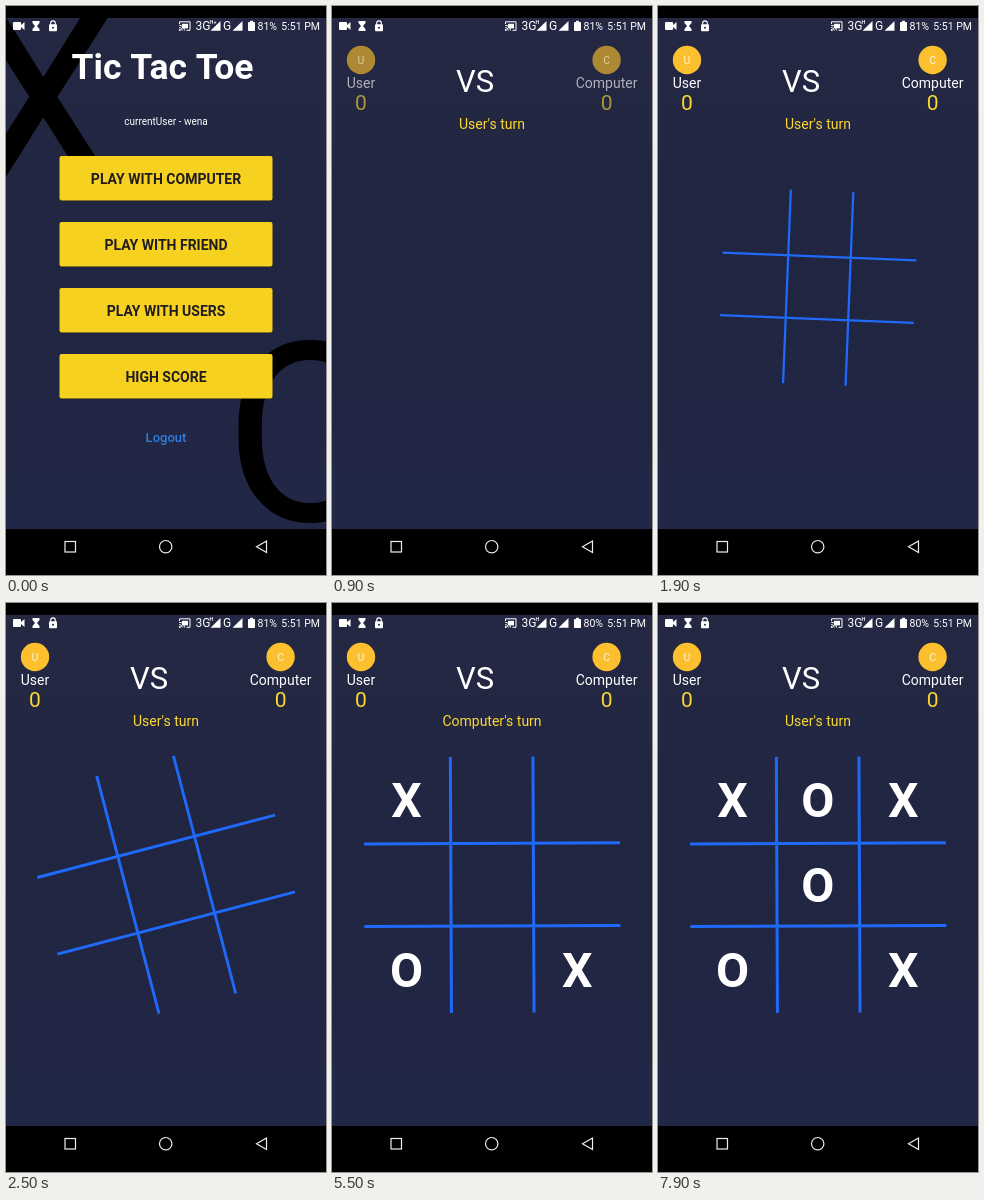
These frames come from a looping animation (320 px wide and 569 px high, 8000 ms). An HTML page with a canvas:

```html
<!DOCTYPE html>
<html lang="en">
<head>
<meta charset="utf-8">
<title>Tic Tac Toe</title>
<style>
html, body { margin: 0; width: 100%; height: 100%; overflow: hidden; background: #000; }
canvas { display: block; width: 320px; height: 569px; }
</style>
</head>
<body>
<canvas id="stage"></canvas>
<script>
const W = 320, H = 569, LOOP = 8000;
const TOP = 12, BOTTOM = 523;
const canvas = document.getElementById('stage');
const ctx = canvas.getContext('2d');
const dpr = window.devicePixelRatio || 1;
canvas.width = W * dpr;
canvas.height = H * dpr;

const YELLOW = '#fdd82f', AMBER = '#fcc02e', WHITE = '#fff', BLUE = '#1f69fb';
const BUTTONS = ['PLAY WITH COMPUTER', 'PLAY WITH FRIEND', 'PLAY WITH USERS', 'HIGH SCORE'];
// time, mark, column, row
const MOVES = [
  [3400, 'X', 0, 0], [4400, 'O', 0, 2], [5320, 'X', 2, 2],
  [6300, 'O', 1, 1], [6750, 'X', 2, 0], [7600, 'O', 1, 0]
];

const clamp = v => Math.max(0, Math.min(1, v));
const ramp = (t, from, to) => clamp((t - from) / (to - from));
const easeOut = p => 1 - Math.pow(1 - p, 3);

function text(str, x, y, size, color, weight = 400, align = 'center') {
  ctx.font = `${weight} ${size}px Roboto, sans-serif`;
  ctx.textAlign = align;
  ctx.fillStyle = color;
  ctx.fillText(str, x, y);
}

function poly(points, fill) {
  ctx.beginPath();
  points.forEach(([x, y]) => ctx.lineTo(x, y));
  ctx.closePath();
  if (fill) {
    ctx.fillStyle = fill;
    ctx.fill();
  } else {
    ctx.stroke();
  }
}

function box(x, y, w, h, r, color) {
  ctx.beginPath();
  ctx.roundRect(x, y, w, h, r);
  ctx.fillStyle = color;
  ctx.fill();
}

function disc(x, y, r, color) {
  ctx.beginPath();
  ctx.arc(x, y, r, 0, Math.PI * 2);
  ctx.fillStyle = color;
  ctx.fill();
}

function background() {
  const g = ctx.createLinearGradient(0, TOP, 0, BOTTOM);
  g.addColorStop(0, '#242843');
  g.addColorStop(0.5, '#202541');
  g.addColorStop(1, '#212746');
  ctx.fillStyle = g;
  ctx.fillRect(0, TOP, W, BOTTOM - TOP);
}

function menu() {
  background();
  text('X', 37, 181, 250, '#000');
  text('O', 304, 515, 250, '#000');
  text('Tic Tac Toe', 156.5, 73, 35.5, WHITE, 700);
  text('currentUser - wena', 160, 119, 10, WHITE);
  BUTTONS.forEach((label, i) => {
    const y = 150 + i * 66;
    box(53.5, y + 0.8, 213, 44.4, 2, 'rgba(0,0,0,0.35)');
    box(53.5, y, 213, 44.4, 2, '#f7d11f');
    text(label, 160, y + 28, 14, '#201d20', 700);
  });
  text('Logout', 160, 435.5, 13, '#2f7de0', 500);
}

function player(x, name) {
  disc(x, 54, 14.2, AMBER);
  text(name[0], x, 58, 10.5, '#fff3d6');
  text(name, x, 82, 14, WHITE);
  text('0', x, 104, 21, YELLOW);
}

function grid(t) {
  const s = easeOut(ramp(t, 1100, 3230));
  if (s <= 0) return;
  ctx.save();
  ctx.translate(160.2, 281.7);
  ctx.rotate((s * 360 - 0.25) * Math.PI / 180);
  ctx.scale(s, s);
  ctx.strokeStyle = BLUE;
  ctx.lineWidth = 3;
  ctx.beginPath();
  for (const d of [-41.3, 41.3]) {
    ctx.moveTo(d, -128);
    ctx.lineTo(d, 128);
    ctx.moveTo(-128, d);
    ctx.lineTo(128, d);
  }
  ctx.stroke();
  ctx.restore();
}

function game(t) {
  const done = MOVES.filter(m => t >= m[0]);
  const who = done.length % 2 ? 'Computer' : 'User';
  const page = ramp(t, 150, 810);
  if (page <= 0) return;
  ctx.globalAlpha = page;
  background();
  text('VS', 143, 85.5, 31, WHITE);
  text(who + "'s turn", 160, 123, 14, YELLOW);

  ctx.globalAlpha = ramp(t, 600, 1070);
  player(29, 'User');
  player(274.6, 'Computer');
  ctx.globalAlpha = 1;

  grid(t);
  for (const [, mark, col, row] of done) {
    text(mark, 74.5 + col * 85.4, 213.5 + row * 85.2, 48, WHITE, 700);
  }
}

function statusBar(t) {
  // camera
  box(7, 16, 8, 8, 1, WHITE);
  poly([[14.5, 19.5], [18.5, 16], [18.5, 24], [14.5, 20.5]], WHITE);
  // hourglass
  poly([[26.5, 15], [33.5, 15], [33.5, 17], [31, 20], [33.5, 23], [33.5, 25],
    [26.5, 25], [26.5, 23], [29, 20], [26.5, 17]], WHITE);
  // padlock
  box(43, 18.3, 8, 7, 1, WHITE);
  ctx.strokeStyle = WHITE;
  ctx.lineWidth = 1.1;
  ctx.beginPath();
  ctx.arc(47, 17.2, 2.3, Math.PI, 0);
  ctx.lineTo(49.3, 19);
  ctx.moveTo(44.7, 17.2);
  ctx.lineTo(44.7, 19);
  ctx.stroke();
  disc(47, 21.8, 1, '#242843');

  // cast
  ctx.lineWidth = 1;
  ctx.beginPath();
  ctx.moveTo(173.5, 18);
  ctx.lineTo(173.5, 15.8);
  ctx.lineTo(184, 15.8);
  ctx.lineTo(184, 24.3);
  ctx.lineTo(180.5, 24.3);
  for (const r of [3, 5.2]) {
    ctx.moveTo(173.2, 24.5 - r);
    ctx.arc(173.2, 24.5, r, -Math.PI / 2, 0);
  }
  ctx.stroke();
  box(176, 17.8, 6, 4.6, 0, WHITE);
  disc(173.8, 24, 1, WHITE);

  // signal, battery, clock
  const plus = t < 250 || (t >= 3450 && t < 5350);
  text('3G', 189.5, 24.3, 12, WHITE, 400, 'left');
  text(plus ? 'H+' : 'H', 203.5, 18, 5.5, WHITE, 500, 'left');
  poly([[204.5, 24.7], [214.5, 24.7], [214.5, 15]], WHITE);
  text('G', 217, 24.3, 12, WHITE, 400, 'left');
  poly([[226.5, 24.7], [236.5, 24.7], [236.5, 15]], WHITE);
  box(242, 16, 7, 9, 0.8, WHITE);
  box(244, 14.8, 3, 2, 0, WHITE);
  text(t < 3000 ? '81%' : '80%', 251.5, 24, 10.5, WHITE, 400, 'left');
  text('5:51 PM', 314, 24, 10.5, WHITE, 400, 'right');
}

function navBar() {
  ctx.fillStyle = '#000';
  ctx.fillRect(0, 0, W, TOP);
  ctx.fillRect(0, BOTTOM, W, H - BOTTOM);
  ctx.strokeStyle = '#eee';
  ctx.lineWidth = 1.2;
  ctx.strokeRect(59, 535.5, 10.5, 10.5);
  ctx.beginPath();
  ctx.arc(159.7, 540.7, 6.2, 0, Math.PI * 2);
  ctx.stroke();
  poly([[250.5, 540.7], [260.5, 535], [260.5, 546.4]]);
}

function draw(t) {
  ctx.setTransform(dpr, 0, 0, dpr, 0, 0);
  ctx.globalAlpha = 1;
  ctx.fillStyle = '#000';
  ctx.fillRect(0, 0, W, H);
  if (t < 810) menu();
  game(t);
  ctx.globalAlpha = 1;
  navBar();
  statusBar(t);
}

const start = performance.now();
function tick() {
  draw((performance.now() - start) % LOOP);
  requestAnimationFrame(tick);
}
tick();
</script>
</body>
</html>
```
